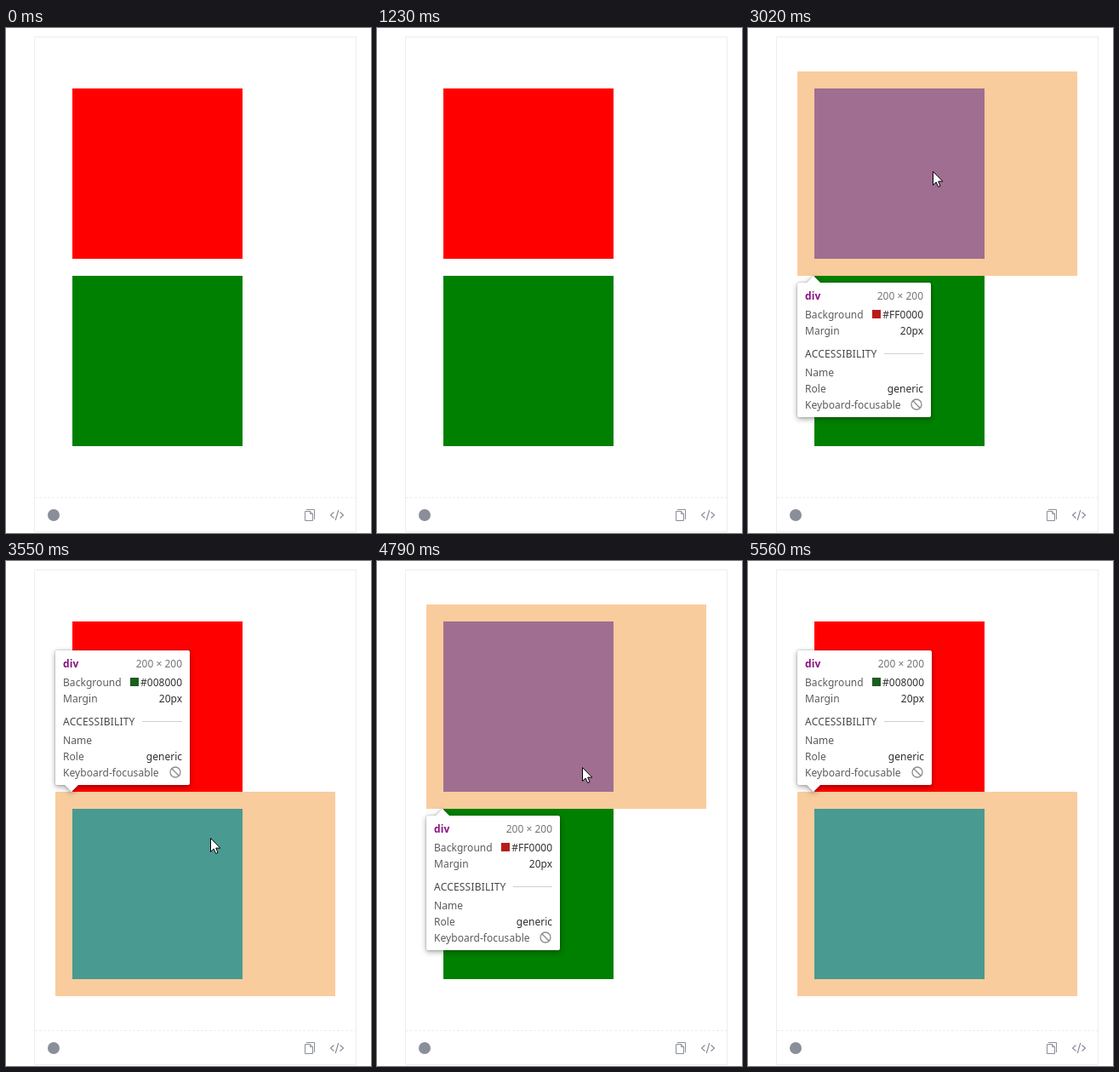
Animation of 429 by 593 pixels, one loop 5630 ms. Source, as an HTML page:

```html
<!DOCTYPE html>
<html lang="en">
<head>
<meta charset="utf-8">
<title>Box inspector</title>
<style>
html, body { margin: 0; width: 100%; height: 100%; overflow: hidden; background: #fff; }
svg { display: block; width: 100%; height: 100%; }
text { font: 12px "Noto Sans", "Open Sans", sans-serif; letter-spacing: .05px; fill: #5c5c5c; white-space: pre; }
.name { font-weight: 700; letter-spacing: .15px; fill: #1a1aa6; }
.tag { fill: #881280; }
.size { fill: #757575; }
.value { fill: #303030; }
.end { text-anchor: end; letter-spacing: 0; }
.head { font-weight: 500; letter-spacing: .2px; fill: #484848; }
.icon { fill: none; stroke: #8a8e99; }
.tip { filter: drop-shadow(0 0 1px rgba(0,0,0,.25)) drop-shadow(0 2px 3px rgba(0,0,0,.35)); fill: #fff; }
.content { fill: rgba(111,168,220,.66); }
.padding { fill: rgba(147,196,125,.55); }
.margin { fill: rgba(246,178,107,.66); }
[data-view], #cursor { visibility: hidden; }
</style>
</head>
<body>
<svg viewBox="0 0 429 593" preserveAspectRatio="xMinYMin meet">
  <rect x="33.5" y="10.5" width="378" height="581" fill="#fff" stroke="#ebedf1"/>
  <path d="M34 551.5H411" stroke="#ebedf1" stroke-dasharray="3 2"/>
  <rect x="78" y="71" width="200" height="200" fill="#f00"/>
  <rect x="78" y="291" width="200" height="200" fill="#008000"/>

  <circle cx="56" cy="572" r="7" fill="#8a8e99"/>
  <g class="icon">
    <path d="M351.5 567.5H357.5L360.5 570.5V578.5H351.5ZM357.5 567.5V570.5H360.5M353 565.5H362.5V577"/>
    <path d="M385.5 568.5L381.5 572L385.5 575.5M392.5 568.5L396.5 572L392.5 575.5M390.8 566L387.2 578" stroke-width="1.2"/>
  </g>

  <g data-view="box">
    <path class="padding" fill-rule="evenodd" d="M34 11H411V551H34ZM58 51H387V511H58Z"/>
    <rect class="content" x="58" y="51" width="329" height="460"/>
    <path class="tip" d="M36 559H45L53 551L61 559H332Q334 559 334 561V620H34V561Q34 559 36 559Z"/>
    <text class="name" x="43" y="579"><tspan class="tag">div</tspan>.__dumi-default-previewer-dem</text>
    <text class="name" x="43" y="595">o</text>
    <text class="size end" x="325" y="579">377 × 540</text>
  </g>
  <g data-view="red"></g>
  <g data-view="green"></g>

  <path id="cursor" d="M.5 .5V16.5L4.2 13L6.6 18.5L9 17.5L6.7 12.1H11.8Z" fill="#fff" stroke="#000" stroke-linejoin="round"/>
</svg>
<script>
const LOOP = 5630;

// Bursts of motion: start, end, number of picture steps
const bursts = [
  [450, 920, 7], [2090, 2470, 6], [3020, 3550, 8],
  [3930, 4160, 4], [4790, 5330, 8], [5400, 5560, 3]
];

// Pointer trips: each point is time, x, y; hidden outside a trip
const trips = [
  { until: 920, points: [[450, 352, 478], [840, 396, 104]] },
  { until: 5560, points: [
    [2090, 416, 78], [2240, 282, 117], [2400, 226, 160], [2470, 217, 168],
    [3020, 217, 168], [3250, 226, 255], [3550, 240, 325],
    [3930, 240, 315], [4080, 241, 239], [4790, 241, 242],
    [4940, 241, 305], [5330, 258, 387], [5480, 292, 470]
  ] }
];

const views = [
  [0, ""], [2160, "box"], [2400, "red"], [3320, "green"],
  [4080, "box"], [4160, "red"], [4940, "box"], [5010, "green"]
];

const row = (y, label, value = "", right = 0) =>
  `<text x="67" y="${y}">${label}</text><text class="value end" x="${right}" y="${y}">${value}</text>`;

// Highlight with margin plus its info card; y is the box top, top the card top
function inspect(y, top, width, color, swatch, below) {
  const right = 58 + width, edge = right - 9, bottom = top + 158;
  const up = below ? "H69L77 " + (top - 8) + "L85 " + top : "";
  const down = below ? "" : "H85L77 " + (bottom + 8) + "L69 " + bottom;
  return `
    <path class="margin" fill-rule="evenodd" d="M58 ${y - 20}H387V${y + 220}H58ZM78 ${y}H278V${y + 200}H78Z"/>
    <rect class="content" x="78" y="${y}" width="200" height="200"/>
    <path class="tip" d="M60 ${top}${up}H${right - 2}q2 0 2 2V${bottom - 2}q0 2 -2 2${down}H60q-2 0 -2 -2V${top + 2}q0 -2 2 -2Z"/>
    <text class="name tag" x="67" y="${top + 20}">div</text>
    <text class="size end" x="${edge}" y="${top + 20}">200 × 200</text>
    ${row(top + 42, "Background", color, edge)}
    <rect x="146" y="${top + 32}" width="10" height="10" fill="${swatch}"/>
    ${row(top + 61, "Margin", "20px", edge)}
    <text class="head" x="67" y="${top + 88}">ACCESSIBILITY</text>
    <path d="M160 ${top + 83.5}H${edge}" stroke="#d0d0d0"/>
    ${row(top + 110, "Name")}
    ${row(top + 129, "Role", "generic", edge)}
    ${row(top + 148, "Keyboard-focusable")}
    <g transform="translate(${edge - 8} ${top + 143})" fill="none" stroke="#8c8c8c" stroke-width="1.3">
      <circle r="6"/><path d="M-4.2 -4.2L4.2 4.2"/>
    </g>`;
}

const groups = [...document.querySelectorAll("[data-view]")];
const cursor = document.getElementById("cursor");
const group = name => groups.find(g => g.dataset.view === name);
group("red").innerHTML = inspect(71, 299, 157, "#FF0000", "#b71c1c", true);
group("green").innerHTML = inspect(291, 105, 158, "#008000", "#1b5e20", false);

const latest = (list, t) => list.filter(item => item[0] <= t).pop();

// Snap time to the step being shown
function stepTime(t) {
  const burst = latest(bursts, t);
  if (!burst) return 0;
  const [start, end, count] = burst;
  const gap = (end - start) / (count - 1);
  const k = Math.min(count - 1, Math.floor((t - start + 5) / gap));
  return Math.round((start + k * gap) / 10) * 10;
}

function pointerAt(t) {
  const trip = trips.find(({ points, until }) => t >= points[0][0] && t < until);
  if (!trip) return null;
  const a = latest(trip.points, t);
  const b = trip.points.find(p => p[0] > t) || a;
  const u = a === b ? 0 : (t - a[0]) / (b[0] - a[0]);
  return [1, 2].map(i => Math.round(a[i] + (b[i] - a[i]) * u));
}

function draw(t) {
  const view = latest(views, t)[1];
  for (const g of groups) g.style.visibility = g.dataset.view === view ? "visible" : "hidden";
  const spot = pointerAt(stepTime(t));
  cursor.style.visibility = spot ? "visible" : "hidden";
  if (spot) cursor.setAttribute("transform", `translate(${spot})`);
}

const began = performance.now();
function tick() {
  draw((performance.now() - began) % LOOP);
  requestAnimationFrame(tick);
}
tick();
</script>
</body>
</html>
```
